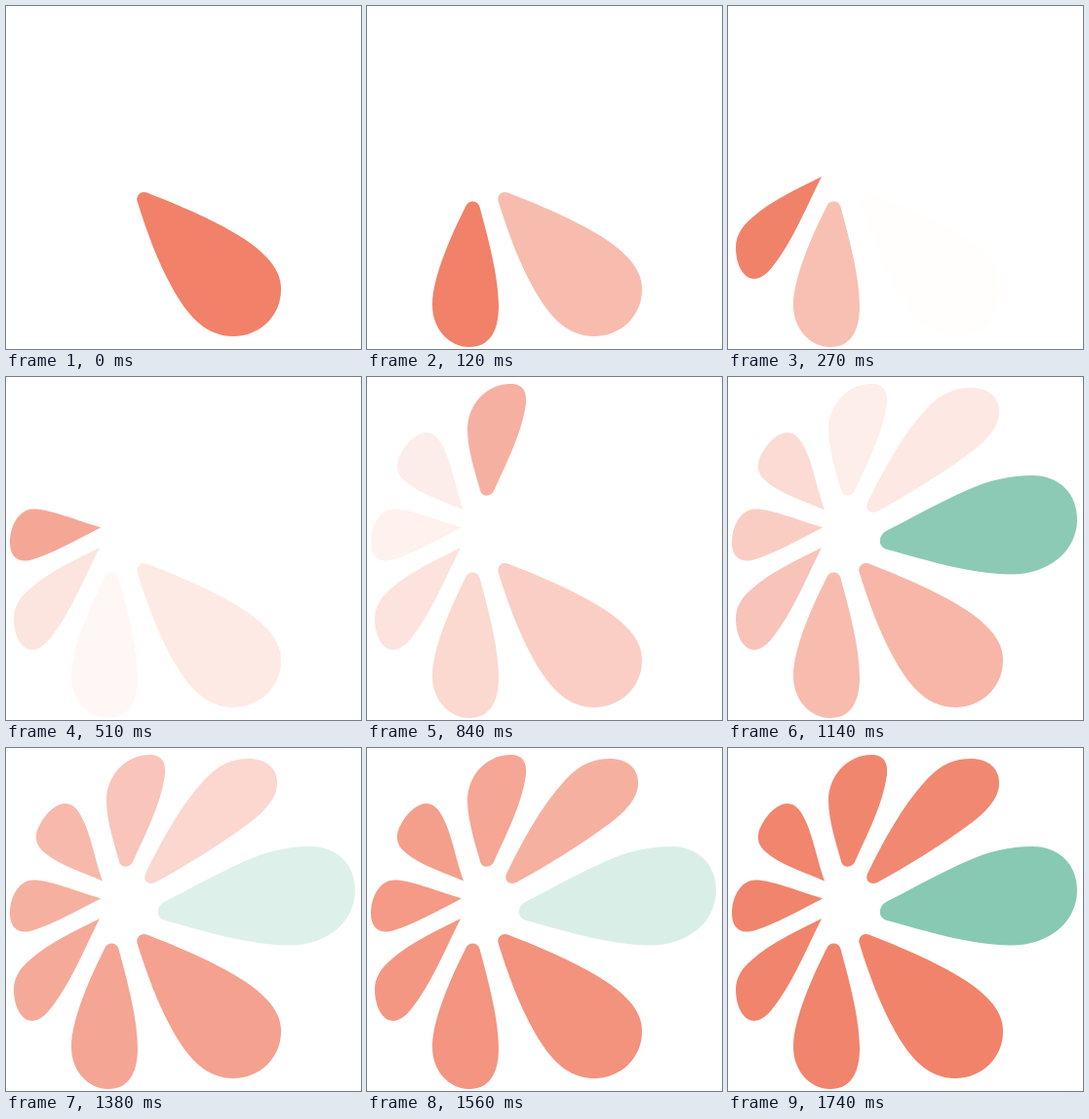
Write an HTML page that moves like this. It is 364 px wide and 352 px high and loops after 1.8 s.

```html
<!DOCTYPE html>
<html lang="en">
<head>
<meta charset="utf-8">
<title>Petal loader</title>
<style>
html, body { margin: 0; width: 100%; height: 100%; overflow: hidden; background: #fff; }
svg { display: block; width: 100%; height: 100%; }
</style>
</head>
<body>
<svg id="flower" viewBox="0 0 364 352"></svg>
<script>
const LOOP = 1800, END = 1775;
const CORAL = '#f18168', GREEN = '#86c8b2';

// Each petal pops in at `start`, fades out until `low`, then returns by `end`.
const petals = [
  { start: 0, low: 255, d: 'M134.5 200C133 195 138 189 144.5 191.5C176 204 220 222 250 243C270 258 282 272 282 291C282 318 260 339 233 339C206 339 188 320 172 292C156 264 144 231 134.5 200Z' },
  { start: 120, low: 420, d: 'M101.5 205C104 199 113 198.5 115.5 206C122 231 135 275 135 308C135 336 124 350 105 350C84 350 67 331 67 307C67 277 88 232 101.5 205Z' },
  { start: 265, low: 575, d: 'M96 175C83 201 70 232 54 256C44 271 36 280 27 280C15 280 8 264 8 248C8 236 14 226 25 217C45 199 73 187 96 175Z' },
  { start: 418, low: 720, d: 'M97 154.5C73 167 47 181 28 187C12 192 4 184 4 170C4 156 10 141 22 136.5C35 132 66 145 97 154.5Z' },
  { start: 568, low: 885, d: 'M99 136.5C80 128 53 120 38 106C29 98 29 88 35 78C42 65 52 57 61 57C70 57 76 66 81 78C88 95 92 117 99 136.5Z' },
  { start: 720, low: 1040, d: 'M116.5 118C111 98 103 74 103 54C103 28 123 7 147 7C160 7 164 15 163 27C159 58 142 90 130 117C127.5 123 118.5 123 116.5 118Z' },
  { start: 870, low: 1200, d: 'M143 129C158 98 178 60 204 32C219 16 233 11 249 11C267 11 278 21 278 36C278 52 264 66 248 78C217 101 184 121 153 138C146 141.5 140 136 143 129Z' },
  { start: 1122, low: 1480, end: 1745, fill: GREEN, d: 'M163 157.5C186 146 214 130 243 117C267 106 289 101 312 101C340 101 358 120 358 146C358 178 330 202.5 290 202.5C250 202.5 204 188 163 177C153 174 154 162 163 157.5Z' }
];

const svg = document.getElementById('flower');
for (const p of petals) {
  p.el = document.createElementNS(svg.namespaceURI, 'path');
  p.el.setAttribute('d', p.d);
  p.el.setAttribute('fill', p.fill || CORAL);
  svg.append(p.el);
}

function opacity({ start, low, end = END }, t) {
  if (t < start) return 0;
  if (t < low) return 1 - (t - start) / (low - start);
  return Math.min(1, (t - low) / (end - low));
}

function draw(t) {
  for (const p of petals) p.el.setAttribute('opacity', opacity(p, t).toFixed(3));
}

let origin;
function tick(now) {
  origin ??= now;
  draw((now - origin) % LOOP);
  requestAnimationFrame(tick);
}
draw(0);
requestAnimationFrame(tick);
</script>
</body>
</html>
```
